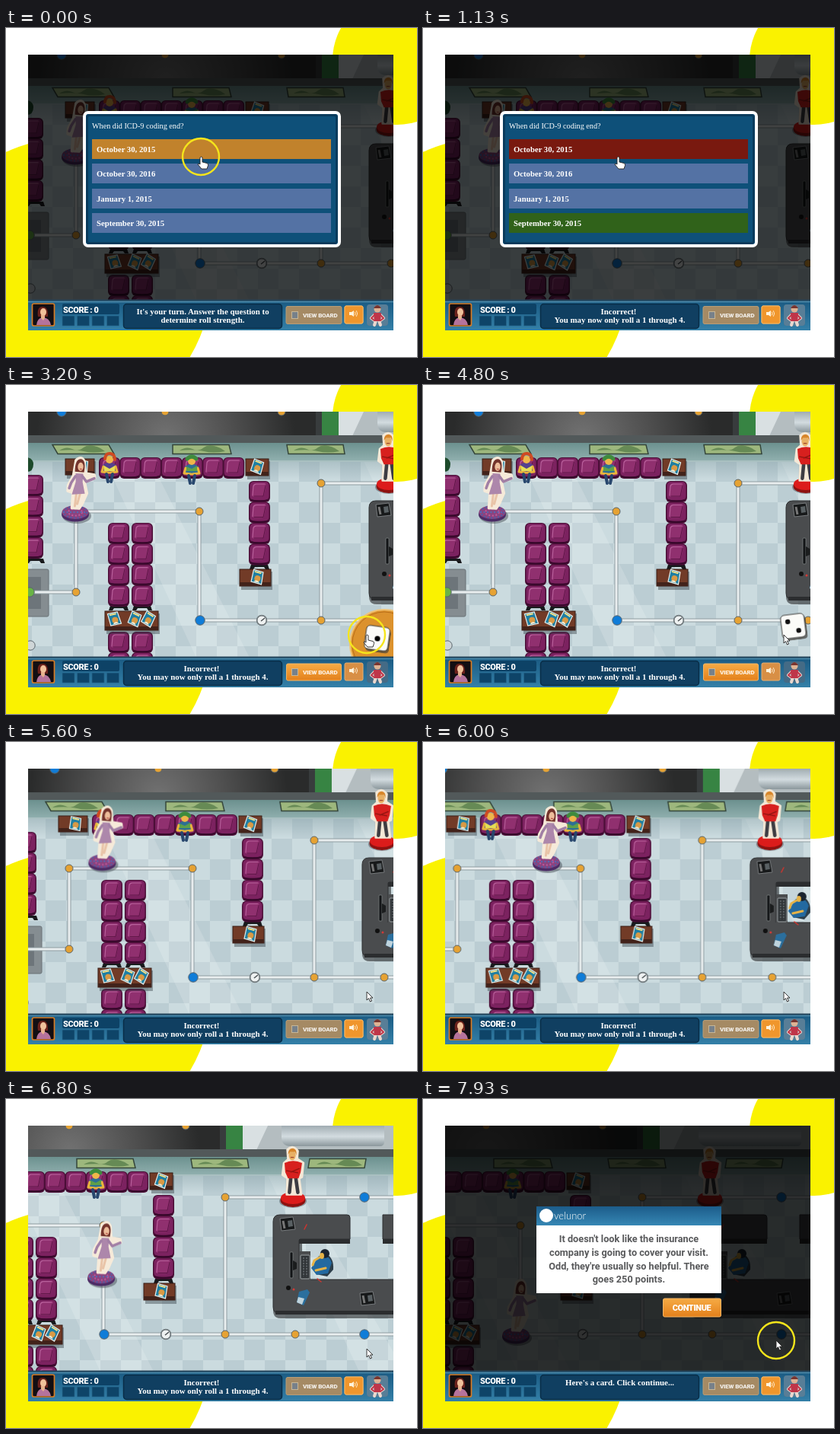
These frames come from a looping animation (540x432 px, 8000 ms). An HTML page:

```html
<!DOCTYPE html>
<html lang="en">
<head>
<meta charset="utf-8">
<title>Board game</title>
<style>
html, body { margin: 0; width: 100%; height: 100%; overflow: hidden; background: #fff; }
svg { display: block; width: 100vw; height: 100vh; }
.slab { font: bold 10.9px "Liberation Serif", serif; fill: #fff; }
.label { font: 900 11px Roboto, sans-serif; font-stretch: 75%; fill: #fff; letter-spacing: -.4px; }
.mid { text-anchor: middle; }
.line { fill: none; stroke-linecap: round; stroke-linejoin: round; }

.a { animation: 8s linear infinite; }
#world { animation-name: pan; }
#token { animation-name: walk; }
#dim { animation-name: dim; }
#panel { animation-name: panel; }
#wrong { animation-name: wrong; }
#right { animation-name: right; }
#msg1 { animation-name: msg1; }
#msg2 { animation-name: msg2; }
#msg3 { animation-name: msg3; }
#idle { animation-name: idle; }
#badge { animation-name: badge; }
#tray { animation-name: tray; }
#die { animation-name: roll; }
#one { animation-name: one; }
#five { animation-name: five; }
#two { animation-name: two; }
#card { animation-name: card; }
#pointer { animation-name: pointer; }
#hand { animation-name: hand; }
#arrow { animation-name: arrow; }
#ring { animation-name: ring; }
#ripple { animation-name: ripple; }

@keyframes pan {
  0%, 67% { transform: translateX(0); animation-timing-function: ease-in; }
  75% { transform: translateX(-47px); animation-timing-function: ease-out; }
  84%, 100% { transform: translateX(-126px); }
}
@keyframes walk {
  0%, 67% { transform: translate(0, 0); }
  71% { transform: translate(59px, -14px); }
  75% { transform: translate(118px, -10px); }
  78%, 80% { transform: translate(162px, -1px); }
  85% { transform: translate(160px, 66px); }
  90%, 100% { transform: translate(157px, 142px); }
}
@keyframes dim {
  0%, 18% { opacity: .72; }
  21%, 91% { opacity: 0; }
  94%, 100% { opacity: .8; }
}
@keyframes panel { 0%, 32% { opacity: 1; } 33.5%, 100% { opacity: 0; } }
@keyframes wrong { 0%, 6% { fill: #c1822c; } 6.01%, 100% { fill: #79190f; } }
@keyframes right { 0%, 6% { fill: #5472a4; } 6.01%, 100% { fill: #30621a; } }
@keyframes msg1 { 0%, 6% { opacity: 1; } 6.01%, 100% { opacity: 0; } }
@keyframes msg2 { 0%, 6% { opacity: 0; } 6.01%, 92% { opacity: 1; } 92.01%, 100% { opacity: 0; } }
@keyframes msg3 { 0%, 92% { opacity: 0; } 92.01%, 100% { opacity: 1; } }
@keyframes idle { 0%, 20% { opacity: 1; } 20.01%, 66% { opacity: 0; } 66.01%, 100% { opacity: 1; } }
@keyframes badge {
  0%, 23% { opacity: 0; transform: translateY(14px); }
  25% { opacity: 1; }
  27.5% { opacity: 1; transform: translateY(0); }
  32%, 100% { opacity: 0; transform: translateY(-16px); }
}
@keyframes tray {
  0%, 21% { opacity: 0; transform: translate(60px, 60px); }
  21.01% { opacity: 1; transform: translate(60px, 60px); }
  25%, 43% { opacity: 1; transform: none; }
  45%, 100% { opacity: 0; transform: translate(60px, 60px); }
}
@keyframes roll {
  0%, 21% { opacity: 0; transform: translate(548px, 393px) rotate(8deg); }
  21.01% { opacity: 1; transform: translate(548px, 393px) rotate(8deg); }
  25%, 43% { opacity: 1; transform: translate(488px, 333px) rotate(8deg); animation-timing-function: ease-out; }
  48% { transform: translate(465px, 262px) rotate(-190deg); animation-timing-function: ease-in; }
  54%, 65% { opacity: 1; transform: translate(487px, 317px) rotate(-367deg); }
  66%, 100% { opacity: 0; transform: translate(487px, 317px) rotate(-367deg); }
}
@keyframes one { 0%, 46% { opacity: 1; } 46.01%, 100% { opacity: 0; } }
@keyframes five { 0%, 46% { opacity: 0; } 46.01%, 51% { opacity: 1; } 51.01%, 100% { opacity: 0; } }
@keyframes two { 0%, 51% { opacity: 0; } 51.01%, 100% { opacity: 1; } }
@keyframes card { 0%, 94% { opacity: 0; } 96%, 100% { opacity: 1; } }
@keyframes pointer {
  0%, 17% { transform: translate(256px, 169px); }
  27.5% { transform: translate(405px, 302px); }
  34%, 91% { transform: translate(474px, 328px); }
  95%, 100% { transform: translate(464px, 317px); }
}
@keyframes hand { 0%, 44% { opacity: 1; } 44.01%, 100% { opacity: 0; } }
@keyframes arrow { 0%, 44% { opacity: 0; } 44.01%, 100% { opacity: 1; } }
@keyframes ring {
  0%, 6% { opacity: 1; }
  9%, 36% { opacity: 0; }
  38%, 42% { opacity: 1; }
  45%, 95% { opacity: 0; }
  96.5%, 100% { opacity: 1; }
}
@keyframes ripple {
  0%, 26% { opacity: 0; transform: scale(.6); }
  27.5% { opacity: .9; transform: none; }
  30%, 100% { opacity: 0; transform: scale(1.3); }
}
</style>
</head>
<body>
<svg viewBox="0 0 540 432">
<defs>
  <clipPath id="screen"><rect x="29" y="35" width="480" height="362"/></clipPath>
  <clipPath id="board"><rect x="29" y="35" width="480" height="323"/></clipPath>
  <pattern id="tiles" x="7" y="100" width="54" height="54" patternUnits="userSpaceOnUse">
    <rect width="54" height="54" fill="#cbdbdf"/>
    <path d="M0 0h27v27H0zM27 27h27v27H27z" fill="#bbcdd3"/>
  </pattern>
  <radialGradient id="room" gradientUnits="userSpaceOnUse" cx="210" cy="70" r="170"><stop stop-color="#727272"/><stop offset=".5" stop-color="#505050"/><stop offset="1" stop-color="#2a2b2b"/></radialGradient>
  <linearGradient id="wall" x2="0" y2="1"><stop stop-color="#6c918f"/><stop offset="1" stop-color="#91b0af"/></linearGradient>
  <linearGradient id="shade" x2="0" y2="1"><stop stop-color="#7d989f" stop-opacity=".4"/><stop offset="1" stop-color="#7d989f" stop-opacity="0"/></linearGradient>
  <linearGradient id="tube" x2="0" y2="1"><stop stop-color="#8f9ca2"/><stop offset=".6" stop-color="#d3dce0"/><stop offset="1" stop-color="#8b979c"/></linearGradient>
  <linearGradient id="bar" x2="0" y2="1"><stop stop-color="#1a5a82"/><stop offset="1" stop-color="#3480a8"/></linearGradient>
  <linearGradient id="head" x2="0" y2="1"><stop stop-color="#1c5c8a"/><stop offset="1" stop-color="#3687b4"/></linearGradient>
  <linearGradient id="gold" x2="0" y2="1"><stop stop-color="#f6ab45"/><stop offset="1" stop-color="#e3801b"/></linearGradient>

  <g id="chair">
    <rect x="-14" y="-14" width="28" height="28" rx="6" fill="#4b0f37"/>
    <rect x="-12.5" y="-13" width="25" height="24" rx="5" fill="#7c2260"/>
    <path d="M-9 -8Q-8 -11 -5 -11H7Q10 -11 9 -8L6 5Q5 7 3 7H-7Q-10 7 -10 4z" fill="#90306f"/>
    <path class="line" d="M-9 5L-8 -7q1 -3 4 -3H7" stroke="#b9629d" stroke-width="1.1"/>
    <path class="line" d="M8 -8L5 6H-7" stroke="#5d1546"/>
    <path class="line" d="M-11 11q11 3 22 0" stroke="#35082a" stroke-width="1.5"/>
  </g>
  <g id="magazine">
    <path d="M-7 -8H6L8 8H-6z" fill="#1f7fa3" stroke="#e8f1ee" stroke-width="1.2"/>
    <path d="M-5 -6H4" stroke="#f5e28a" stroke-width="2"/>
    <circle cx="1" cy="2" r="4" fill="#d99a45"/>
    <path d="M-3 7q4 -5 8 0z" fill="#f2e9d0"/>
  </g>
  <g id="reader">
    <path d="M-9 -2Q0 -9 9 -2L8 8H-8z"/>
    <path class="line" d="M-8 0L-10 7 -1 8M8 0L10 7 1 8" stroke="#e9b53c" stroke-width="3"/>
    <path class="line" d="M-4 10L-2 20M4 10L2 20" stroke="#27466d" stroke-width="4"/>
    <circle cy="-9" r="5" fill="#efb64a"/>
  </g>
  <g id="phone">
    <path d="M-10 -7L7 -9 10 7 -8 9z" fill="#17191a" stroke="#888c8e" stroke-width=".8"/>
    <path d="M-6 -4L-4 6" stroke="#777" stroke-width="3"/>
    <path d="M0 -4L6 -5 7 3 1 4z" fill="#596063"/>
  </g>
</defs>

<circle cx="514" cy="42" r="85" fill="#faf200"/>
<circle cx="80" cy="334" r="189" fill="#faf200"/>

<g clip-path="url(#screen)">
  <g clip-path="url(#board)">
    <g id="world" class="a">
      <rect x="20" y="35" width="640" height="330" fill="url(#tiles)"/>
      <path d="M130 100H190L320 358H250zM470 100H500L650 358H590z" fill="#fff" opacity=".16"/>
      <rect x="20" y="100" width="640" height="24" fill="url(#shade)"/>
      <rect x="20" y="35" width="640" height="35" fill="#b4bdc0"/>
      <rect x="20" y="35" width="387" height="32" fill="url(#room)"/>
      <rect x="407" y="35" width="8" height="32" fill="#383c3d"/>
      <rect x="415" y="35" width="22" height="32" fill="#378443"/>
      <path d="M437 35H470L455 67H437z" fill="#d9e0e2"/>
      <path d="M488 30H623V56Q623 62 617 62H500Q488 62 488 50z" fill="url(#tube)"/>
      <rect x="20" y="66" width="640" height="11" fill="#52595a"/>
      <rect x="20" y="76" width="640" height="24" fill="url(#wall)"/>
      <path d="M20 100H660" stroke="#a9c0c1" stroke-width="2"/>
      <g id="pictures"></g>
      <rect x="20" y="242" width="36" height="62" rx="2" fill="#858d91" stroke="#697175"/>
      <rect x="20" y="252" width="26" height="42" fill="#6d757a"/>
      <path d="M20 94q16 0 16 10t-9 10h-7z" fill="#1d4a2b"/>
      <g id="track" class="line"></g>
      <g id="dots"></g>
      <g id="seats"></g>
      <g id="tables"></g>

      <use href="#reader" x="136" y="107" fill="#55428e"/>
      <path class="line" d="M130 97q1 -8 7 -7t6 8" stroke="#cf4a22" stroke-width="4"/>
      <path d="M129 106L136 110 143 106V113H129z" fill="#e5df56"/>
      <use href="#reader" x="244" y="109" fill="#2d6f94"/>
      <path class="line" d="M238 97q6 -6 12 0" stroke="#3f8b3d" stroke-width="5"/>
      <path d="M237 107L244 110 251 106V113H237z" fill="#5da04a"/>

      <g id="desk">
        <path d="M487 155H578V190H515V240H660V288H487Q477 288 477 278V165Q477 155 487 155z" fill="#27292b" opacity=".6"/>
        <path d="M486 152H574Q578 152 578 156V184H513Q511 184 511 186V237H660V282H486Q477 282 477 273V161Q477 152 486 152zM621 152H660V184H621z" fill="#4a4c4e" stroke="#2d2f31"/>
        <path d="M511 184H578V190H511zM621 184H660V190H621zM480 278H660V283H480z" fill="#2b2d2f"/>
        <path d="M511 200H526V238H511z" fill="#4a4c4e"/>
        <use href="#phone" x="496" y="164"/>
        <use href="#phone" x="601" y="262"/>
        <rect x="499" y="201" width="4" height="34" rx="1" fill="#131517" stroke="#858a8c" stroke-width=".7"/>
        <path d="M503 212L508 215V223L503 225z" fill="#1b1d1e"/>
        <rect x="513" y="205" width="12" height="31" rx="1" fill="#313538" stroke="#9da3a5"/>
        <path d="M517 208V233M521 208V233" stroke="#858c8f" stroke-dasharray="2 1.5"/>
        <circle cx="497" cy="248" r="3" fill="#111"/>
        <circle cx="504" cy="250" r="1.5" fill="#d43a36"/>
        <path class="line" d="M518 171L521 165M535 236L540 240" stroke="#cf352f" stroke-width="1.5"/>
        <path d="M511 253L522 250 525 254 517 271 508 267z" fill="#2b6f9d"/>
        <path d="M510 260L518 262 515 270 508 267z" fill="#bfd3dc"/>
        <path d="M546 203Q557 208 556 224L548 233 533 230z" fill="#2b3d49"/>
        <path d="M537 206Q550 203 554 215L549 229 534 231 527 222z" fill="#2369a0"/>
        <path class="line" d="M538 208L531 212 529 218M546 222L533 225" stroke="#e6b347" stroke-width="3"/>
        <circle cx="545" cy="203" r="6" fill="#1a2430"/>
        <ellipse cx="541" cy="206" rx="3" ry="4" fill="#e6b347"/>
      </g>

      <g transform="translate(503 130)">
        <ellipse cy="4" rx="18" ry="9" fill="#485058" opacity=".5"/>
        <ellipse cy="3" rx="16.5" ry="9" fill="#8e1210"/>
        <ellipse rx="16" ry="8" fill="#dc1c1b"/>
        <g transform="scale(.92)">
          <path d="M-8 -69Q0 -77 7 -67L6 -56 15 -50 13 -30 9 -28 12 -5H-9L-8 -28 -15 -33 -13 -50 -7 -55z" fill="#f4e8d6" stroke="#f4e8d6" stroke-width="3" stroke-linejoin="round"/>
          <path class="line" d="M-3 -29L-5 -8M4 -29L7 -8" stroke="#3d3c42" stroke-width="5"/>
          <path d="M-12 -50Q0 -56 13 -50L11 -37 8 -28H-7L-11 -37z" fill="#d7201e"/>
          <path class="line" d="M-9 -39L7 -36M9 -42L-3 -37" stroke="#911511" stroke-width="1.5"/>
          <ellipse cx="-1" cy="-61" rx="5" ry="7" fill="#e8b064"/>
          <path d="M-7 -62Q-7 -71 0 -71 6 -70 5 -61L3 -66H-4z" fill="#d8862a"/>
          <path class="line" d="M-3 -58h4" stroke="#8b261d"/>
        </g>
      </g>

      <g id="token" class="a">
        <g transform="translate(91 167)">
          <ellipse cx="2" cy="5" rx="19" ry="10" fill="#485058" opacity=".5"/>
          <ellipse cy="3" rx="18" ry="9.5" fill="#4c2b66"/>
          <ellipse rx="17.5" ry="9" fill="#8a447f"/>
          <g fill="none" stroke-width="2" stroke-dasharray="2 2.5">
            <ellipse rx="15" ry="7.5" stroke="#4d5fa8"/><ellipse rx="9" ry="4.5" stroke="#c0589b"/><path d="M-16 0H16" stroke="#546ab4"/>
          </g>
          <g transform="translate(0 -2) rotate(4)">
            <path d="M-4 -66q7 -8 12 1l2 15 12 1 1 5 -13 6 4 14 -5 14 -4 7H-5V-23L-12 -25 -12 -33 -6 -46z" fill="#f6ead9" stroke="#f6ead9" stroke-width="3" stroke-linejoin="round"/>
            <path class="line" d="M0 -24L-1 -6M5 -24L2 -9" stroke="#e9c4a8" stroke-width="3"/>
            <path d="M-3 -49H7L7 -38 11 -23 -6 -21 -2 -38z" fill="#ad87ab"/>
            <path class="line" d="M6 -46L12 -39 22 -44M-3 -45L-8 -36 -10 -29" stroke="#a17fa5" stroke-width="3.5"/>
            <path d="M-4 -51Q-5 -68 3 -68 10 -67 8 -51z" fill="#74342c"/>
            <ellipse cx="3" cy="-58" rx="3.7" ry="5.5" fill="#edbd9b"/>
            <path d="M2 -55h3" stroke="#ad3936"/>
          </g>
        </g>
      </g>
    </g>

    <g id="tray" class="a">
      <circle cx="497" cy="340" r="45" fill="#dc922d" stroke="#f0c377" stroke-width="2"/>
      <circle cx="497" cy="340" r="42" fill="none" stroke="#b96e19"/>
    </g>
    <g id="die" class="a">
      <rect x="-14" y="-13" width="31" height="31" rx="5" fill="#423f39" opacity=".7"/>
      <rect x="-16" y="-16" width="31" height="31" rx="5" fill="#fbfbf8" stroke="#3c3c3b"/>
      <circle id="one" class="a" r="3.6"/>
      <path id="five" class="a line" d="M-8 -8h0M7 -8h0M0 0h0M-8 7h0M7 7h0" stroke="#111" stroke-width="6"/>
      <path id="two" class="a line" d="M-7 -7h0M6 6h0" stroke="#111" stroke-width="6.5"/>
    </g>
    <rect id="dim" class="a" x="29" y="35" width="480" height="323"/>
  </g>

  <g id="hud">
    <rect x="29" y="358" width="480" height="39" fill="url(#bar)"/>
    <path d="M29 357.500H509" stroke="#25455a" stroke-width="2"/>
    <path d="M29 359.500H509" stroke="#4f8cab" stroke-width="1.5"/>
    <rect x="34.5" y="362" width="29" height="29" rx="2" fill="#130e12" stroke="#d77c25" stroke-width="1.7"/>
    <path d="M42 379Q40 366 48 366 56 366 55 379z" fill="#6b221c"/>
    <ellipse cx="49" cy="373" rx="4" ry="5" fill="#f0c19b"/>
    <path d="M40 390Q41 381 48 380 57 380 59 390z" fill="#b5739c"/>
    <path d="M46 377h5v4l-2 3 -3 -3z" fill="#e6b18d"/>
    <rect x="74" y="362" width="75" height="14" rx="2" fill="#0d4266"/>
    <text class="label" x="75" y="373.5">SCORE : 0</text>
    <path d="M74 378h16v13H74zM93.500 378h16v13h-16zM113 378h16v13h-16zM132.500 378h16v13h-16z" fill="#0e4468" stroke="#27678d" stroke-width=".7"/>
    <rect x="154.500" y="362.500" width="208" height="32" rx="4" fill="#103f61" stroke="#082d47" stroke-width="1.5"/>
    <g class="slab mid">
      <g id="msg1" class="a"><text x="258.500" y="375.500">It's your turn. Answer the question to</text><text x="258.500" y="386.500">determine roll strength.</text></g>
      <g id="msg2" class="a"><text x="257" y="375.500">Incorrect!</text><text x="258.500" y="386.500">You may now only roll a 1 through 4.</text></g>
      <g id="msg3" class="a"><text x="258.500" y="375.500">Here's a card. Click continue...</text></g>
    </g>
    <rect x="368.500" y="366" width="72" height="22" rx="2" fill="url(#gold)" stroke="#f5b665"/>
    <rect x="445" y="365" width="24" height="23" rx="2" fill="#d88f45" stroke="#e8af71"/>
    <rect x="474" y="363" width="28" height="28" rx="4" fill="#446b86"/>
    <g id="idle" class="a">
      <rect x="368" y="365.500" width="73" height="23" rx="2" fill="#a58a64" stroke="#b79d78"/>
      <rect x="445" y="365" width="24" height="23" rx="2" fill="#f0962c" stroke="#f7b55e"/>
      <rect x="474" y="363" width="28" height="28" rx="4" fill="#587e97"/>
    </g>
    <rect x="375.500" y="372.500" width="8" height="9" fill="#77818a" stroke="#c6b697"/>
    <text class="label" x="390" y="380" style="font-size:8px;letter-spacing:-.2px" fill-opacity=".85">VIEW BOARD</text>
    <path d="M451 373h3l3 -2v8l-3 -2h-3z" fill="#fff3db"/>
    <path class="line" d="M458.500 373q1.500 2 0 4M460.500 371.500q2.500 3.500 0 7" stroke="#fff3db" stroke-width=".9"/>
    <path class="line" d="M485 376L480 381 484 384M491 376L496 381 492 384M486 384L484 390M490 384L492 390" stroke="#ead7ce" stroke-width="4"/>
    <path class="line" d="M485 376L480 381 484 384M491 376L496 381 492 384" stroke="#bf3549" stroke-width="2"/>
    <path d="M483 374h10l-1 11h-8z" fill="#bf3549"/>
    <circle cx="488" cy="369" r="4.500" fill="#dfb293"/>
    <path d="M483 368q5 -8 10 0z" fill="#783530"/>
  </g>

  <g id="panel" class="a">
    <rect x="103" y="111" width="335" height="175" rx="5" fill="#0e5079" stroke="#fff" stroke-width="4"/>
    <rect x="106.500" y="114.500" width="328" height="168" rx="3" fill="none" stroke="#0a3b5c" stroke-width="3"/>
    <text x="113" y="132" class="slab" style="font-size:10.200px;font-weight:400">When did ICD-9 coding end?</text>
    <g fill="#5472a4">
      <rect id="wrong" class="a" x="113" y="146" width="314" height="26"/>
      <rect x="113" y="178" width="314" height="26"/>
      <rect x="113" y="211" width="314" height="26"/>
      <rect id="right" class="a" x="113" y="243" width="314" height="26"/>
    </g>
    <g class="slab" style="font-size:10.700px">
      <text x="119" y="163">October 30, 2015</text>
      <text x="119" y="195">October 30, 2016</text>
      <text x="119" y="227.500">January 1, 2015</text>
      <text x="119" y="259.500">September 30, 2015</text>
    </g>
  </g>

  <g id="badge" class="a">
    <text class="mid" x="165" y="140" style="font:bold 22px 'Liberation Sans',sans-serif;paint-order:stroke" fill="#4a2a2e" stroke="#d9a9a2" stroke-width="3">0</text>
  </g>

  <g id="card" class="a">
    <rect x="149" y="141" width="243" height="114" fill="#fff"/>
    <rect x="149" y="141" width="243" height="25" fill="url(#head)"/>
    <circle cx="162" cy="153" r="9" fill="#fff"/>
    <text x="172" y="158" style="font:300 13px Lato,sans-serif" fill="#fff">velunor</text>
    <g class="mid" style="font:bold 12.700px Roboto,sans-serif" fill="#58595b">
      <text x="270.500" y="188">It doesn't look like the insurance</text>
      <text x="270.500" y="206">company is going to cover your visit.</text>
      <text x="270.500" y="223.500">Odd, they're usually so helpful. There</text>
      <text x="270.500" y="241">goes 250 points.</text>
    </g>
    <rect x="315.500" y="262" width="76" height="24" rx="2" fill="url(#gold)" stroke="#f5b665"/>
    <text class="label mid" x="353" y="278">CONTINUE</text>
  </g>

  <g id="pointer" class="a">
    <circle id="ring" class="a" r="24" fill="none" stroke="#f5e51b" stroke-width="2.400"/>
    <circle id="ripple" class="a" r="10" fill="none" stroke="#456fa8" stroke-width="1.300" stroke-dasharray="3 1"/>
    <path id="hand" class="a" d="M-1 1q2 -2 3 0V7l6 1.500q2 .5 1.500 3L8 16H1L-4 10q0 -2 3 0z" fill="#fff" stroke="#222" stroke-width=".9"/>
    <path id="arrow" class="a" d="M0 0V11L2.500 8.500 4.500 13 6.500 12 4.500 8H8z" fill="#fff" stroke="#222" stroke-width=".9"/>
  </g>
</g>
</svg>
<script>
const fill = (id, items, draw) => {
  document.getElementById(id).innerHTML = items.map(draw).join('');
};

fill('pictures', [[61, 7], [219, 0], [369, 2], [525, -2]], ([x, lean]) => `
  <path d="M${x} 78.500h74l${lean || 3} 12H${x + lean}z" fill="#9db77d" stroke="#34453a" stroke-width="1.500"/>
  <path d="M${x + 9} 86q9 -6 17 -2t15 -2 22 1l6 4q-16 3 -28 0t-32 -1z" fill="#668a55"/>`);

const lines = 'M20 272H92V166H254V309H660M414 309V129H660';
fill('track', [['#8f9da2', 5], ['#e9eeef', 3]], ([color, width]) =>
  `<path d="${lines}" stroke="${color}" stroke-width="${width}"/>`);

const orange = '#e6a233', blue = '#0f7cd8';
fill('dots', [
  [73, 35, blue], [209, 35, orange], [362, 35, orange], [31, 272, '#69b445'],
  [92, 272, orange], [92, 166, orange], [254, 166, orange], [414, 129, orange],
  [414, 309, orange], [506, 309, orange], [255, 309, blue], [597, 309, blue], [597, 129, blue],
  [336, 309, '#eef1f1'], [32, 342, '#cfd6d8']
], ([x, y, color]) =>
  `<circle cx="${x}" cy="${y}" r="${color === orange ? 5 : 6.200}" fill="${color}" stroke="#59646a"/>` +
  (x === 336 ? `<circle cx="336" cy="309" r="6.500" fill="none" stroke="#747d80" stroke-width="1.500"/>
  <path d="M335 310L340 306" stroke="#454b4e" stroke-width="1.500"/>` : ''));

const run = (count, x, y, dx, dy) =>
  Array.from({ length: count }, (_, i) => [x + i * dx, y + i * dy]);
const leg = (x, y) => `<path d="M${x - 11} ${y}h22l2 6h-5l-2 -3h-12l-2 3h-5z" fill="#18191c"/>`;
fill('seats', [
  ...run(7, 136, 109, 27.200, 0), ...run(4, 333, 140, 0, 27.500),
  ...run(4, 35, 132, 0, 27.300), ...run(4, 148, 195, 0, 27.300), ...run(4, 179, 195, 0, 27.300),
  ...run(2, 148, 338, 0, 27), ...run(2, 179, 338, 0, 27)
], ([x, y]) => `<use href="#chair" x="${x}" y="${y}"/>`);
document.getElementById('seats').insertAdjacentHTML('afterbegin',
  leg(333, 236) + leg(38, 228) + leg(148, 290) + leg(179, 290));

// Each table: x, y, width, height, then the magazines as x offset and angle.
fill('tables', [
  [78, 97, 38, 21, [[22, 12]]], [315, 97, 30, 22, [[15, 22]]],
  [307, 242, 41, 22, [[23, 16]]], [130, 297, 70, 25, [[12, -12], [39, 25], [57, 32]]]
], ([x, y, w, h, mags]) => `
  <rect x="${x + 2}" y="${y + 3}" width="${w}" height="${h + 2}" fill="#29343a" opacity=".4"/>
  <rect x="${x}" y="${y}" width="${w}" height="${h}" fill="#723b27" stroke="#371b13"/>
  <path d="M${x} ${y + h - 5}h${w}v5h${-w}z" fill="#42221a"/>` +
  mags.map(([dx, turn]) =>
    `<use href="#magazine" transform="translate(${x + dx} ${y + 10}) rotate(${turn})"/>`).join(''));
</script>
</body>
</html>
```
